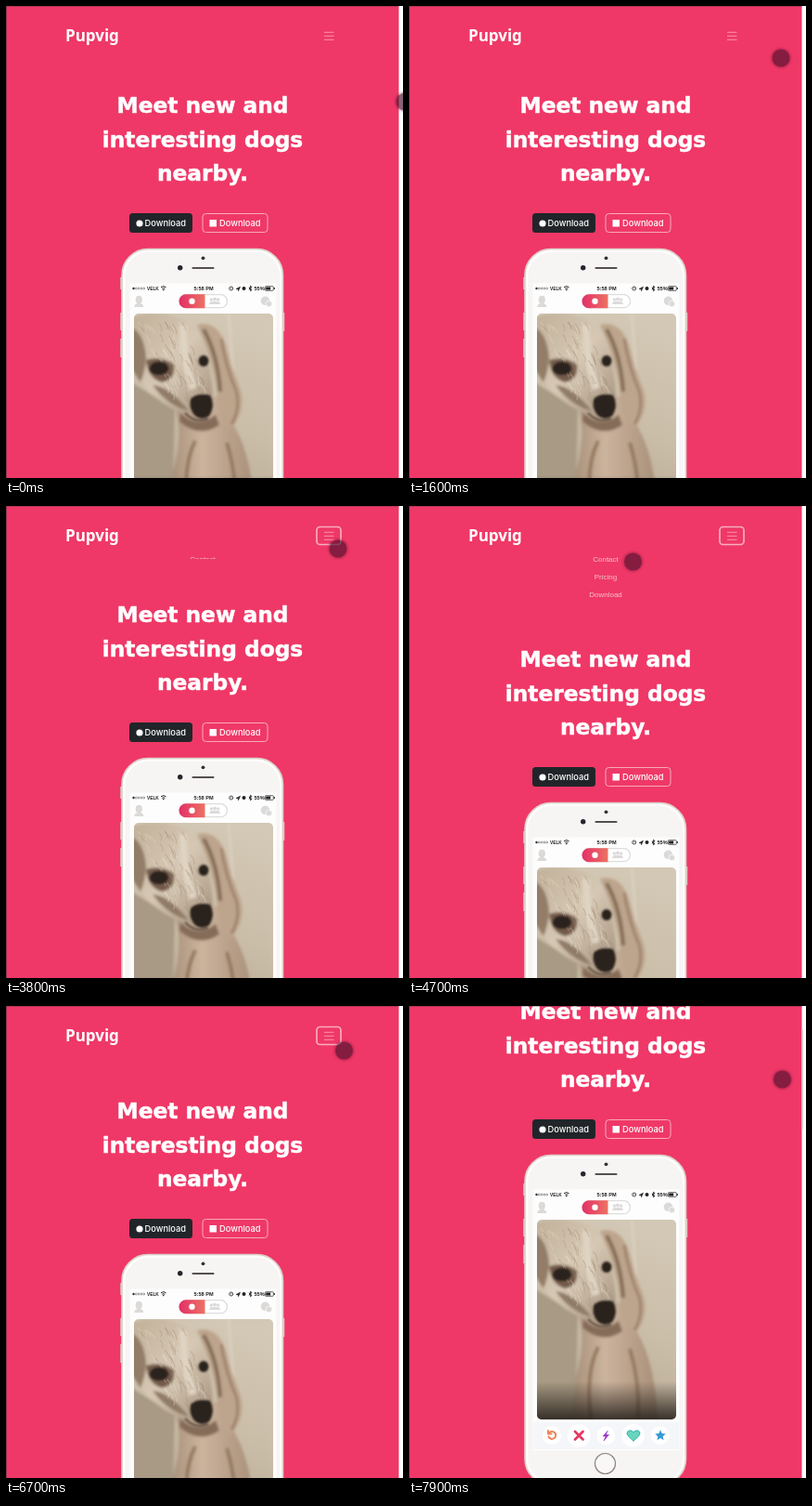
Recreate the animation shown at these times as an HTML page. Size 428x508 px, loop 8 s.

```html
<!DOCTYPE html>
<html lang="en">
<head>
<meta charset="utf-8">
<title>Dog app landing page</title>
<style>
  html, body { margin: 0; width: 100%; height: 100%; overflow: hidden; background: #fff; }
  svg { display: block; }
  .brand { font: 700 17px "Noto Sans", "Open Sans", sans-serif; fill: #fff; }
  .links { font: 8px "Liberation Sans", Arial, sans-serif; fill: #fff; fill-opacity: .68; text-anchor: middle; }
  .title { font: 700 23.3px "DejaVu Sans", Verdana, sans-serif; text-anchor: middle;
           fill: #fff; stroke: #fff; stroke-width: .5px; }
  .button { font: 500 9.3px Inter, "Open Sans", sans-serif; fill: #fff; }
  .status { font: 700 5.6px "Liberation Sans", Arial, sans-serif; fill: #222; }
  .status .carrier { font-size: 4.8px; }
</style>
</head>
<body>
<svg width="428" height="508" viewBox="0 0 428 508">
  <defs>
    <linearGradient id="wall" x1=".6" y1="0" x2=".3" y2="1">
      <stop offset="0" stop-color="#d3c8b5"/><stop offset=".5" stop-color="#cabda8"/><stop offset="1" stop-color="#b3a58f"/>
    </linearGradient>
    <linearGradient id="fur" x1="0" y1="0" x2="1" y2="1">
      <stop offset="0" stop-color="#bfae97"/><stop offset=".5" stop-color="#d6c8b4"/><stop offset="1" stop-color="#a18d78"/>
    </linearGradient>
    <linearGradient id="body" x1="0" y1="0" x2="1" y2="0">
      <stop offset="0" stop-color="#a28b75"/><stop offset=".4" stop-color="#cbb39d"/><stop offset="1" stop-color="#a88f79"/>
    </linearGradient>
    <linearGradient id="shade" x1="0" y1="0" x2="0" y2="1">
      <stop offset="0" stop-color="#221d18" stop-opacity="0"/><stop offset="1" stop-color="#221d18" stop-opacity=".85"/>
    </linearGradient>
    <linearGradient id="tab">
      <stop offset="0" stop-color="#e32f68"/><stop offset="1" stop-color="#ec7263"/>
    </linearGradient>
    <filter id="soft"><feGaussianBlur stdDeviation="1.5"/></filter>
    <filter id="glow" x="-50%" y="-50%" width="200%" height="200%"><feGaussianBlur stdDeviation="1"/></filter>
    <clipPath id="page-clip"><rect width="423.5" height="508"/></clipPath>
    <clipPath id="menu-clip"><rect id="menu-window" x="100" y="47" width="224" height="0"/></clipPath>
    <clipPath id="photo-clip"><rect x="138" y="331" width="150" height="215" rx="5"/></clipPath>
  </defs>

  <rect width="428" height="508" fill="#fff"/>
  <g clip-path="url(#page-clip)">
    <rect width="424" height="508" fill="#ef3867"/>
    <g id="page">
      <text class="brand" x="64" y="38">Pupvig</text>
      <path d="M343 28.3h10.5M343 32.3h10.5M343 36.3h10.5" stroke="#fff" stroke-opacity=".45"/>
      <rect id="focus" x="335" y="22.5" width="26" height="19" rx="3.5" fill="none" stroke="#fff" stroke-opacity=".58" stroke-width="1.7"/>
      <g class="links" clip-path="url(#menu-clip)">
        <text x="212" y="59.7">Contact</text>
        <text x="212" y="78.7">Pricing</text>
        <text x="212" y="97.7">Download</text>
      </g>

      <g id="content">
        <g class="title">
          <text x="212" y="115">Meet new and</text>
          <text x="212" y="151.5">interesting dogs</text>
          <text x="212" y="188">nearby.</text>
        </g>
        <g class="button">
          <rect x="133" y="223" width="68" height="21" rx="3.5" fill="#212529"/>
          <circle cx="144" cy="234" r="3.6"/>
          <text x="149.5" y="237.2">Download</text>
          <rect x="212" y="223.5" width="70" height="20" rx="3.5" fill="none" stroke="#f8a9bd"/>
          <rect x="219.5" y="230" width="7.5" height="7.5"/>
          <text x="230" y="237.2">Download</text>
        </g>

        <g id="phone">
          <path d="M124.5 292v13M124.5 330v19M124.5 358v20M299 330v20" stroke="#dcc9c2" stroke-width="2.5"/>
          <rect x="125" y="261.5" width="173.5" height="355" rx="28" fill="#f7f5f3" stroke="#dccfc8" stroke-width="1.6"/>
          <rect x="127.5" y="264" width="168.5" height="350" rx="26" fill="none" stroke="#fff" stroke-width="1.5"/>
          <circle cx="212.5" cy="271.3" r="1.9" fill="#333"/>
          <circle cx="187.7" cy="281.8" r="2.7" fill="#25252b"/>
          <path d="M201.5 282h22" stroke="#55504f" stroke-width="2.2" stroke-linecap="round"/>
          <rect x="133.5" y="298.5" width="158" height="281" fill="#fdfdfd"/>

          <g class="status">
            <g id="signal"></g>
            <text class="carrier" x="152" y="305.8">VELK</text>
            <path d="M167 302.8q2.8-2.4 5.6 0M168.3 304.3q1.5-1.3 3 0" fill="none" stroke="#222"/>
            <circle cx="169.8" cy="305.6" r=".8"/>
            <text x="213" y="306" text-anchor="middle">5:58 PM</text>
            <circle cx="242.7" cy="304" r="2" fill="none" stroke="#222" stroke-width=".8"/>
            <path d="M242.7 303v1.6M248 304.5l4.500-2.200-2 4.400-.3-2zM262 302.500l3 3-1.500 1.400v-5.800l1.500 1.400-3 3" stroke="#222" stroke-width=".6"/>
            <circle cx="256.500" cy="304" r="2"/>
            <text x="267.500" y="306">55%</text>
            <rect x="279.300" y="301.700" width="9" height="4.600" rx=".8" fill="none" stroke="#222" stroke-width=".7"/>
            <path d="M280.200 302.600h5v2.800h-5zM288.800 303h1v2h-1z"/>
          </g>

          <g fill="#dcdad9">
            <ellipse cx="143.3" cy="316" rx="3.6" ry="4.3"/>
            <path d="M138.3 324q0-4 5-4.3q5 .3 5 4.3z"/>
            <circle cx="279.5" cy="317.3" r="4.8"/>
            <circle cx="283.4" cy="320.5" r="3.3" stroke="#fdfdfd" stroke-width=".7"/>
          </g>
          <rect x="187" y="310.7" width="51.5" height="14" rx="7" fill="#fff" stroke="#deddde" stroke-width="1.3"/>
          <path d="M214.5 310.2v15H194a7.5 7.5 0 0 1 0-15z" fill="url(#tab)"/>
          <circle cx="200.5" cy="317.8" r="3.2" fill="#fff"/>
          <g fill="#dcdadb">
            <circle cx="221.3" cy="316" r="1.7"/><circle cx="225" cy="315.5" r="2"/><circle cx="228.7" cy="316" r="1.7"/>
            <path d="M219 321q.5-3 3-3h6q2.5 0 3 3z"/>
          </g>

          <g clip-path="url(#photo-clip)">
            <rect x="138" y="331" width="150" height="215" fill="url(#wall)"/>
            <g filter="url(#soft)">
              <path d="M130 402L182 434L178 560H130z" fill="#a89a84"/>
              <path d="M240 331l5 62" fill="none" stroke="#ddd3c3" stroke-width="2"/>
              <path d="M182 430Q192 462 180 500L173 560H268Q268 490 246 452L228 420z" fill="url(#body)"/>
              <path d="M206 343Q228 338 237 365Q243 389 252 411Q260 434 243 455Q232 449 228 420Q224 384 206 343z" fill="#bda48c"/>
              <path d="M213 348Q228 374 231 415" fill="none" stroke="#816a55" stroke-width="4"/>
              <path d="M232 358Q237 389 248 414Q253 434 243 450" fill="none" stroke="#9a7b66" stroke-width="2.5"/>
              <path d="M130 337Q162 325 192 337Q210 352 217 378Q228 426 219 442Q206 452 192 439Q168 430 151 412Q134 390 130 337z" fill="url(#fur)"/>
              <path d="M134 345Q149 352 151 378Q150 394 145 405L134 388z" fill="#927d67"/>
              <path d="M151 381Q168 376 181 386Q183 402 168 405Q153 401 151 381z" fill="#735a48"/>
              <path d="M158 408Q176 409 197 436Q174 430 158 408z" fill="#8f7a66"/>
              <path d="M191 344Q190 376 202 412" fill="none" stroke="#dfd3c1" stroke-width="8"/>
              <path d="M188 438Q206 455 226 440L230 451Q208 466 187 447z" fill="#856c59"/>
              <path d="M204 468Q190 495 196 545M238 470Q249 505 247 545" fill="none" stroke="#95785f" stroke-width="4"/>
            </g>
            <g id="hair" fill="none" stroke-width="1.1" stroke-linecap="round"></g>
            <g filter="url(#glow)" fill="#2a211d">
              <ellipse cx="165" cy="390" rx="10" ry="7"/>
              <ellipse cx="213" cy="382" rx="5.5" ry="6"/>
              <path d="M199 423Q206 416 220 419Q226 430 219 441Q211 447 203 440Q197 433 199 423z"/>
              <path d="M193 438Q204 450 218 444" fill="none" stroke="#5f4b3d" stroke-width="2"/>
            </g>
            <rect x="138" y="505" width="150" height="41" fill="url(#shade)"/>
          </g>

          <rect x="134" y="549" width="157" height="29" fill="#f5f6f9"/>
          <g id="actions"></g>
          <g fill="none" stroke-linecap="round" stroke-linejoin="round">
            <path d="M151 560.5a4 4 0 1 1-.5 4M150 558v3.5h3.5" stroke="#ee855c" stroke-width="2"/>
            <path d="M179 559l8.5 8.5M187.5 559l-8.5 8.5" stroke="#e43662" stroke-width="2.7"/>
            <path d="M214 558.5l-5 5.5h3l-2 5 5.5-6.5h-3z" fill="#9638c4" stroke="#9638c4" stroke-width=".6"/>
            <path d="M242 569q-11-8-5-11q3.5-1 5 2q1.5-3 5-2q6 3-5 11z" fill="#68d4bf" stroke="#39b6ac"/>
          </g>
          <path id="star" fill="#3998d6"/>
          <circle cx="211.5" cy="593.5" r="11" fill="#faf8f6" stroke="#8d8582" stroke-width="1.2"/>
        </g>
      </g>
    </g>
  </g>
  <path d="M.5 0V508" stroke="#4b3540" stroke-opacity=".55"/>
  <path d="M0 .5H424" stroke="#4b3540" stroke-opacity=".3"/>
  <rect id="thumb" x="423.5" width="1.5" height="108" fill="#d8cfd2"/>
  <g id="cursor">
    <circle r="10.8" fill="#5a1230" fill-opacity=".3" filter="url(#glow)"/>
    <circle r="9.5" fill="#46142a" fill-opacity=".5"/>
  </g>
</svg>
<script>
  const LOOP = 8000, STEP = 100;
  const MENU_HEIGHT = 58, MENU_TIME = 350, OPEN_AT = 3750, CLOSE_AT = 6480;
  const SCROLL_AT = 7550, SCROLL_TIME = 300, SCROLL_BY = 101;
  const byId = id => document.getElementById(id);
  const page = byId('page'), content = byId('content'), cursor = byId('cursor');
  const focus = byId('focus'), menuWindow = byId('menu-window'), thumb = byId('thumb');

  const repeat = (count, draw) => Array.from({ length: count }, (_, i) => draw(i)).join('');
  byId('signal').innerHTML = repeat(5, i =>
    `<circle cx="${137.5 + i * 2.8}" cy="304" r="1" fill="${i ? 'none' : '#222'}" stroke="#222" stroke-width=".4"/>`);
  byId('actions').innerHTML = repeat(5, i =>
    `<circle cx="${154 + i * 29.2}" cy="563.3" r="${i % 2 ? 12.3 : 10}" fill="#fff"/>`);
  byId('star').setAttribute('d', repeat(10, i => {
    const r = i % 2 ? 2.8 : 6, a = i * Math.PI / 5;
    return `${i ? 'L' : 'M'}${271 + r * Math.sin(a)} ${563.3 - r * Math.cos(a)}`;
  }) + 'z');

  // Short strands that follow the slope of the head.
  let seed = 7;
  const random = () => (seed = seed * 16807 % 2147483647) / 2147483647;
  byId('hair').innerHTML = repeat(90, i => {
    const down = random(), x = 142 + down * 30 + random() * 48, y = 340 + down * 82;
    return `<path d="M${x} ${y}q${2 + random() * 3} 4 ${1 + random() * 5} ${6 + random() * 5}"
      stroke="${i % 2 ? '#9a866f' : '#e6dccb'}" stroke-opacity=".35"/>`;
  });

  // [time, x, y]
  const path = [
    [0, 430, 103], [900, 415, 70], [1600, 401, 56], [1800, 391, 54], [2300, 367, 46],
    [3100, 360.5, 46], [3800, 358, 46], [4700, 241.5, 60], [5000, 250, 64], [5400, 344, 50],
    [5600, 360, 48], [6300, 360.5, 48], [6700, 364.5, 48], [7200, 405, 76], [7900, 402.5, 79]
  ];
  const progress = (t, start, length) => Math.max(0, Math.min(1, (t - start) / length));
  const smooth = p => p * p * (3 - 2 * p);

  // The CSS "ease" curve, solved by bisection.
  function ease(p) {
    const bezier = (s, a, b) => 3 * s * (1 - s) ** 2 * a + 3 * s * s * (1 - s) * b + s ** 3;
    let lo = 0, hi = 1;
    for (let i = 0; i < 20; i++) {
      const mid = (lo + hi) / 2;
      if (bezier(mid, .25, .25) < p) lo = mid; else hi = mid;
    }
    return bezier(lo, .1, 1);
  }

  function cursorAt(t) {
    const i = Math.max(1, path.findIndex(k => k[0] >= t));
    const [t0, x0, y0] = path[i - 1], [t1, x1, y1] = path[i];
    const p = (t - t0) / (t1 - t0);
    return [x0 + (x1 - x0) * p, y0 + (y1 - y0) * p];
  }

  function render(t) {
    const open = ease(progress(t, OPEN_AT, MENU_TIME)) - ease(progress(t, CLOSE_AT, MENU_TIME));
    const shift = MENU_HEIGHT * Math.max(0, open);
    const scroll = SCROLL_BY * smooth(progress(t, SCROLL_AT, SCROLL_TIME));
    page.setAttribute('transform', `translate(0 ${-scroll})`);
    content.setAttribute('transform', `translate(0 ${Math.round(shift)})`);
    menuWindow.setAttribute('height', shift);
    focus.setAttribute('visibility', t >= OPEN_AT ? 'visible' : 'hidden');
    thumb.setAttribute('visibility', scroll > 0 ? 'visible' : 'hidden');
    thumb.setAttribute('y', 3 + scroll * .215);
    cursor.setAttribute('transform', `translate(${cursorAt(t)})`);
  }

  function tick(now) {
    render(Math.floor(now % LOOP / STEP) * STEP);
    requestAnimationFrame(tick);
  }
  render(0);
  requestAnimationFrame(tick);
</script>
</body>
</html>
```
